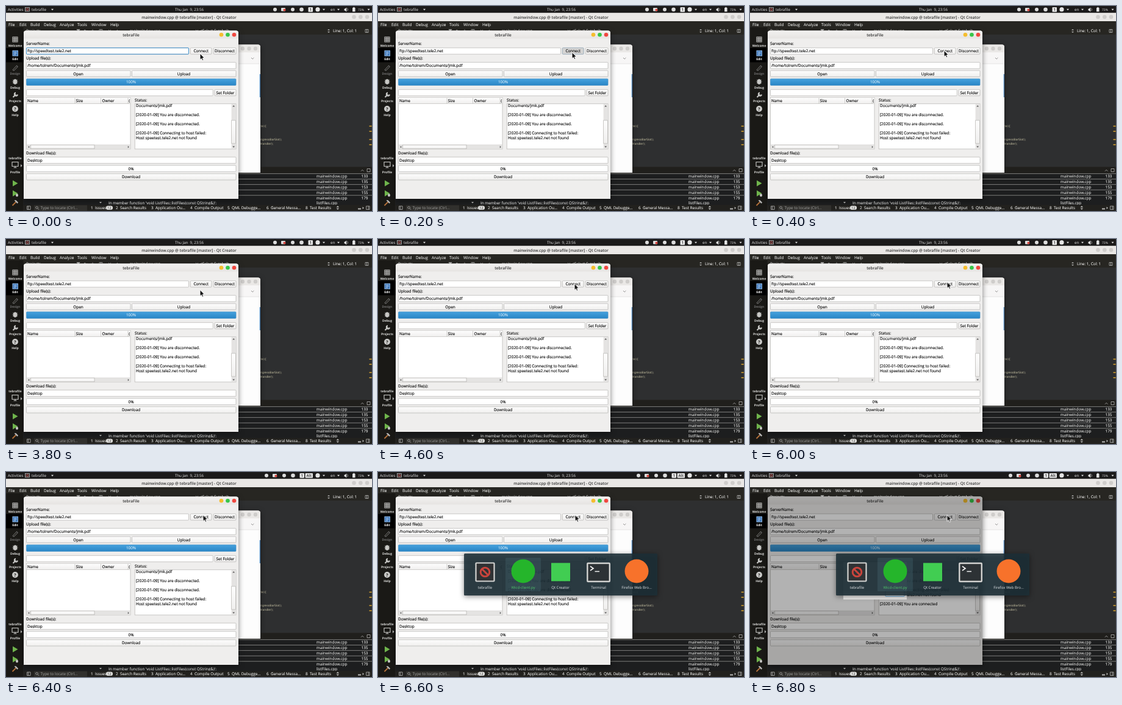
Write an HTML page that moves like this. It is 600 by 337 pixels and loops after 8000 ms.

```html
<!DOCTYPE html>
<html lang="en">
<head>
<meta charset="utf-8">
<title>tebraFile</title>
<style>
html, body { margin: 0; width: 100%; height: 100%; overflow: hidden; background: #2e2f30; }
svg { display: block; width: 100vw; height: 100vh; font: 6.4px "Open Sans", "Noto Sans", sans-serif; text-rendering: geometricPrecision; }
text { white-space: pre; }
.mid { text-anchor: middle; }
.end { text-anchor: end; }
.bold { font-weight: 600; }
.ink { fill: #111; stroke: #111; stroke-width: .16; }
.light { fill: #e6e6e4; stroke: #e6e6e4; stroke-width: .1; }
.mode { font-size: 5px; font-weight: 700; text-anchor: middle; fill: #dededc; }
.icon { fill: none; stroke: #c8c8c6; stroke-width: 1.1; }
.field { fill: #fff; stroke: #b4b2b0; stroke-width: .7; }
.button { fill: url(#face); stroke: #b4b2b0; stroke-width: .7; }
.tool { fill: none; stroke: #b8b8b6; stroke-width: .8; }
.raised { filter: drop-shadow(0 2px 4px rgba(0, 0, 0, .5)); }

/* every change is a hard cut */
.focus, .pressed, .cursor, .tray, .alt, .switcher, .dim, .log, .thumb {
  animation: 8s step-end infinite;
}
.focus { animation-name: focus; }
.pressed { animation-name: press; }
.cursor { animation-name: point; }
.tray { animation-name: shift; }
.alt { animation-name: alt; }
.switcher { animation-name: switch; }
.dim { animation-name: dim; }
.log { animation-name: scroll; }
.thumb { animation-name: thumb; }
@keyframes focus { 0% { opacity: 1 } 2.5%, 100% { opacity: 0 } }
@keyframes press { 0% { opacity: 0 } 2.5% { opacity: 1 } 5%, 100% { opacity: 0 } }
@keyframes point {
  0% { transform: translate(318px, 78px) }
  2.5% { transform: translate(318px, 76px) }
  5% { transform: translate(318px, 73px) }
  47.5% { transform: translate(318px, 83.5px) }
  50% { transform: translate(317px, 88px) }
  52.5% { transform: translate(318px, 78px) }
  55% { transform: translate(322px, 75px) }
  57.5% { transform: translate(322px, 73.5px) }
  62.5% { transform: translate(322px, 72.5px) }
  65% { transform: translate(323px, 71.5px) }
  67.5%, 100% { transform: translate(323px, 70.5px) }
}
@keyframes shift { 0% { transform: none } 77.5%, 100% { transform: translateX(-14px) } }
@keyframes alt { 0% { opacity: 0 } 77.5%, 100% { opacity: 1 } }
@keyframes switch { 0% { opacity: 0 } 82.5%, 100% { opacity: 1 } }
@keyframes dim { 0% { opacity: 0 } 85%, 100% { opacity: 1 } }
@keyframes scroll { 0% { transform: none } 85%, 100% { transform: translateY(-15px) } }
@keyframes thumb { 0% { transform: none } 85%, 100% { transform: translateY(2px) } }
</style>
</head>
<body>
<svg viewBox="0 0 600 337" preserveAspectRatio="none">
<defs>
  <linearGradient id="face" x2="0" y2="1"><stop stop-color="#fdfdfd"/><stop offset="1" stop-color="#f0efee"/></linearGradient>
  <linearGradient id="full" x2="0" y2="1"><stop stop-color="#45a1dd"/><stop offset="1" stop-color="#2a86c6"/></linearGradient>
  <linearGradient id="bar" x2="0" y2="1"><stop stop-color="#f2f1f0"/><stop offset="1" stop-color="#e6e4e2"/></linearGradient>
  <clipPath id="logBox"><rect x="211.5" y="161" width="157" height="73.5"/></clipPath>
  <clipPath id="lastRow"><rect x="29" y="317" width="571" height="9.8"/></clipPath>
  <path id="down" d="M-2-1h4l-2 2.5z"/>
  <path id="window" d="M29 317V44.5a4 4 0 0 1 4-4h344a4 4 0 0 1 4 4V317z"/>
</defs>

<!-- IDE frame -->
<rect width="600" height="337" fill="#2e2f30"/>
<rect y="25" width="600" height="22" fill="#272622"/>
<rect y="11" width="600" height="14" fill="#eae8e6"/>
<text class="mid bold" x="300" y="20.5" font-size="6.5" fill="#333">mainwindow.cpp @ tebrafile [master] - Qt Creator</text>
<g fill="#cfcdcb"><circle cx="570.5" cy="18" r="3.3"/><circle cx="581.3" cy="18" r="3.3"/><circle cx="592" cy="18" r="3.3"/></g>
<g class="light" font-size="6.5">
  <text x="4" y="32.6">File</text><text x="22" y="32.6">Edit</text><text x="40" y="32.6">Build</text>
  <text x="62" y="32.6">Debug</text><text x="88" y="32.6">Analyze</text><text x="117" y="32.6">Tools</text>
  <text x="140" y="32.6">Window</text><text x="171" y="32.6">Help</text>
</g>
<g class="light">
  <text x="33" y="43">Projects</text><text x="203" y="43">mainwindow.cpp</text>
  <text x="318" y="43">&lt;Select Symbol&gt;</text><text x="536" y="43">Line: 1, Col: 1</text>
</g>
<g class="tool">
  <path d="M116 38.5h5l-2 2.5v3h-1v-3z" fill="#b8b8b6"/>
  <path d="M128 41h6M128 39.5h2.5M131.5 42.5h2.5M142 38.5v5M139.5 41h5M153 38.5h5v5h-5zM155.5 38.5v5M168 39l4 4M172 39l-4 4"/>
  <path d="M181 41h5M183 39l-2 2 2 2M311 39l4 4M315 39l-4 4"/>
  <path d="M589 38.5h5v5h-5zM591.5 38.5v5"/>
</g>
<path d="M527 40l2-2 2 2zM527 42l2 2 2-2z" fill="#b8b8b6"/>

<!-- mode sidebar -->
<rect y="35" width="28.5" height="302" fill="#1a1916"/>
<rect y="69" width="28.5" height="23.5"/>
<g class="icon">
  <path d="M11 51h8v8h-8zM11 53.7h8M11 56.3h8M13.7 51v8M16.3 51v8"/>
  <rect x="11" y="73.5" width="8.5" height="8.5" fill="#3a74b8" stroke="#8db4de"/>
  <path d="M13 76h4.5M13 78h4.5M13 80h3" stroke="#e4f1ff" stroke-width=".7"/>
  <path d="M11 105l6.5-7 1.8 1.8-6.5 6.5z" stroke="#686866"/>
  <ellipse cx="15" cy="124.5" rx="2.7" ry="3.7" fill="#c8c8c6"/>
  <path d="M11 121.5l8 5.5M11 127l8-5.5M10.5 124.3h9" stroke-width=".8"/>
  <path d="M11.5 150l4.8-4.8M16 142.5a2.6 2.6 0 1 0 3 3" stroke-width="2"/>
  <circle cx="15" cy="169" r="5" fill="#c8c8c6" stroke="none"/>
  <path d="M10 256.5h10v7h-10zM15 263.5v2M12.5 265.7h5"/>
</g>
<text class="mid" x="15" y="171.6" font-size="7" font-weight="700" fill="#1a1916">?</text>
<path d="M24 260l2.5 2.5-2.5 2.5z" fill="#c8c8c6"/>
<g class="mode">
  <text x="15" y="66.5">Welcome</text><text x="15" y="89.3" fill="#fff">Edit</text><text x="15" y="112.8" fill="#707070">Design</text>
  <text x="15" y="135.5">Debug</text><text x="15" y="158.3">Projects</text><text x="15" y="181.3">Help</text>
  <text x="15" y="251.5">tebrafile</text><text x="15" y="274.8">Profile</text>
</g>
<path d="M11 286.5l8.5 5-8.5 5zM11 303l8.5 5-8.5 5z" fill="#6fb44c"/>
<ellipse cx="18" cy="311" rx="2" ry="2.6" fill="#c8c8c6"/>
<path d="M10.5 328l6-6" stroke="#b5713a" stroke-width="1.8"/><path d="M13.5 319.5l5 5.2 1.6-1.6-4-4.2z" fill="#b9b9b9"/>

<!-- editor remains -->
<g font-size="4.6" font-family="DejaVu Sans, sans-serif" fill="#c9c4a4">
  <text x="417.5" y="198.8">te){</text><text x="417" y="220.8">ngressBarSlot);</text><text x="417" y="227.6">Handler);</text>
</g>
<path d="M595.5 197.5h4M595.5 206h4M595.5 219.5h4M595.5 228h4" stroke="#dba52c" stroke-width="1.6"/>

<!-- window behind -->
<g class="raised">
  <path d="M370 63.5h43a4 4 0 0 1 4 4V274h-47z" fill="#fdfdfd"/>
  <path d="M370 63.5h43a4 4 0 0 1 4 4V76.500h-47z" fill="#eae8e6"/>
</g>
<rect x="370" y="76.5" width="47" height="18.5" fill="#f7f6f6"/>
<path d="M380 95h37" stroke="#dcdcdc" stroke-width=".7"/>
<g fill="#cfcdcb"><circle cx="388" cy="70" r="3.2"/><circle cx="398.5" cy="70" r="3.2"/><circle cx="409" cy="70" r="3.2"/></g>
<path d="M402 85l2.2 2.2 2.2-2.2" fill="none" stroke="#777" stroke-width=".8"/>
<path d="M416.3 112v38" stroke="#4580b8" stroke-width="1.2"/>

<!-- issues pane -->
<rect x="28.500" y="274.500" width="571.500" height="52.500" fill="#1d1e1f"/>
<path d="M417.500 264.500H600v10.500H380v-1h37.500z" fill="#201f1c"/>
<path class="tool" d="M582 271.500l2.200-2.200 2.200 2.200M592 267.500h5v5h-5z"/>
<path d="M380 275.600h220M380 284.500h220M380 293.400h220M380 302.300h220M380 311.200h220" stroke="#a6a6a4" stroke-width=".7"/>
<g class="light">
  <text x="509" y="282">mainwindow.cpp</text><text class="end" x="593.500" y="282">133</text>
  <text x="509" y="290.900">mainwindow.cpp</text><text class="end" x="593.500" y="290.900">135</text>
  <text x="509" y="299.800">mainwindow.cpp</text><text class="end" x="593.500" y="299.800">153</text>
  <text x="509" y="308.700">mainwindow.cpp</text><text class="end" x="593.500" y="308.700">155</text>
  <text x="509" y="317.600">mainwindow.cpp</text><text class="end" x="593.500" y="317.600">179</text>
  <g clip-path="url(#lastRow)">
    <text x="168" y="325.500">In member function 'void ListFiles::listFiles(const QString&amp;)':</text><text x="509" y="325.800">listFiles.cpp</text>
  </g>
</g>
<path d="M153 322h4l-2 2.500z" fill="#b8b8b6"/>

<!-- status bar -->
<rect x="28.500" y="326.800" width="571.500" height="10.200" fill="#22211e"/>
<path class="tool" d="M34.500 329h5.500v5.500h-5.500zM36.500 329v5.500M590.500 329h5.500v5.500h-5.500zM594 329v5.500"/>
<path d="M577 332.500h5v2h-5zM584.500 330l2.500 2-2.500 2z" fill="#b8b8b6"/>
<rect x="46" y="327.500" width="87" height="9" fill="#31302d"/>
<path class="tool" d="M52 332.800l2 2M50.500 329.500a1.800 1.800 0 1 0 .1 0"/>
<text x="56.500" y="334.300" fill="#a5a5a3">Type to locate (Ctrl...</text>
<g class="light">
  <text x="139" y="334.300">1  Issues</text><text x="180" y="334.300">2  Search Results</text>
  <text x="238" y="334.300">3  Application Ou...</text><text x="302" y="334.300">4  Compile Output</text>
  <text x="363" y="334.300">5  QML Debugge...</text><text x="427" y="334.300">6  General Messa...</text>
  <text x="491" y="334.300">8  Test Results</text>
</g>
<rect x="164" y="328.500" width="11" height="6.500" rx="3" fill="#e0e0de"/>
<text class="mid" x="169.500" y="333.800" font-size="5.500" fill="#222">12</text>
<path d="M541.500 331l2.300-2.500 2.300 2.500zM541.500 332.500l2.300 2.500 2.300-2.500z" fill="#b8b8b6"/>

<!-- top panel -->
<rect width="600" height="11.200" fill="#1b1a1a"/>
<g fill="#e4e4e4" font-size="6.200">
  <text x="3" y="7.900">Activities</text><text x="42" y="7.900">tebrafile</text>
  <text class="mid" x="300.500" y="7.900">Thu Jan  9, 23:56</text>
  <text x="532" y="7.900">en</text><text x="577" y="7.600" font-size="5">73%</text>
  <use href="#down" x="76" y="5.700"/><use href="#down" x="521" y="5.700"/><use href="#down" x="545" y="5.700"/><use href="#down" x="594.500" y="5.700"/>
  <circle cx="511" cy="5.700" r="3.600"/>
  <path d="M554.500 4.500h1.500l2.200-2v7l-2.200-2h-1.500z"/><rect x="568" y="2.800" width="4.500" height="6.500" rx=".6"/><rect x="569.300" y="1.800" width="2" height="1"/>
</g>
<path d="M559.500 3.500q2 2.300 0 4.600" class="tool"/>
<rect x="31.500" y="2.500" width="7" height="6.200" fill="#333" stroke="#ccc" stroke-width=".7"/><circle cx="35" cy="5.600" r="1.800" fill="none" stroke="#c44" stroke-width=".8"/>
<g class="tray">
  <g fill="#dcdcdc"><circle cx="441" cy="5.700" r="3"/><rect x="451" y="3" width="7" height="5.500" rx="1"/><circle cx="470" cy="5.700" r="3"/><circle cx="484.500" cy="5.700" r="3.300"/></g>
  <circle cx="456.500" cy="6.500" r="2" fill="#d8433c"/>
  <rect x="495.500" y="2" width="7.500" height="7.800" rx="1" fill="#e6e6e6"/>
  <text class="mid bold" x="499.200" y="8.200" font-size="6.200" fill="#222">1</text>
</g>
<g class="alt"><rect x="490.500" y="2" width="12.500" height="7.800" rx="1" fill="#e6e6e6"/><text class="mid bold" x="496.700" y="8.200" font-size="6.200" fill="#222">Alt</text></g>

<!-- transfer window -->
<use class="raised" href="#window" fill="#efeeed"/>
<path d="M29 53.500V44.500a4 4 0 0 1 4-4h344a4 4 0 0 1 4 4v9z" fill="url(#bar)"/>
<text class="mid bold" x="205" y="49.600" font-size="6.500" fill="#333">tebraFile</text>
<circle cx="353" cy="47.300" r="3.300" fill="#f5bd2e"/><circle cx="363.500" cy="47.300" r="3.300" fill="#37c648"/><circle cx="374" cy="47.300" r="3.300" fill="#f0473f"/>
<g class="ink">
  <text x="33" y="64.300">ServerName:</text><text x="33" y="88.400">Upload file(s):</text>
  <text x="211" y="156.800">Status:</text><text x="33" y="244">Download file(s):</text>
</g>
<rect class="field" x="33.500" y="68.800" width="266" height="10.400" rx="1"/>
<rect class="focus" x="33.500" y="68.800" width="266" height="10.400" rx="1" fill="none" stroke="#3d8fca"/>
<rect class="button" x="302.300" y="68.800" width="34.700" height="10.400" rx="1"/>
<rect class="pressed" x="302.300" y="68.800" width="34.700" height="10.400" rx="1" fill="#d5d4d3" stroke="#8fa9bd" stroke-width=".7"/>
<rect class="button" x="340.300" y="68.800" width="36.700" height="10.400" rx="1"/>
<rect class="field" x="33.500" y="92.600" width="343.500" height="10.400" rx="1"/>
<rect class="button" x="33.500" y="106.200" width="170.500" height="10.200" rx="1"/>
<rect class="button" x="206.500" y="106.200" width="170.500" height="10.200" rx="1"/>
<rect x="33.500" y="119.800" width="343.500" height="10.600" rx="1" fill="url(#full)" stroke="#3a8cc4" stroke-width=".7"/>
<rect class="field" x="33.500" y="137.300" width="305.800" height="10.400" rx="1"/>
<rect class="button" x="342.200" y="137.300" width="34.800" height="10.400" rx="1"/>
<rect class="field" x="33.500" y="150.500" width="170.500" height="84.500"/>
<path d="M33.800 150.800h170v9.700h-170z" fill="url(#face)"/>
<path d="M33.800 160.500h170M113 151v9.500M155.500 151v9.500M200 151v9.500M33.800 228.300h170" stroke="#bfbdbb" stroke-width=".7"/>
<rect x="33.800" y="228.600" width="170" height="6.200" fill="#e4e3e2"/>
<rect class="button" x="40.500" y="228.600" width="104.500" height="6.100"/>
<path d="M38.200 230l-2 1.700 2 1.700zM199.800 230l2 1.700-2 1.700z" fill="#555"/>
<rect class="field" x="211.200" y="160.800" width="165.800" height="74.200"/>
<rect x="369.600" y="161.100" width="7.100" height="73.600" fill="#e4e3e2"/>
<rect class="button thumb" x="369.700" y="188" width="6.900" height="38"/>
<path d="M371.300 165.500l1.900-2.200 1.900 2.200zM371.300 230.500l1.900 2.200 1.900-2.200z" fill="#555"/>
<rect class="field" x="33.500" y="248.300" width="343.500" height="10.400" rx="1"/>
<rect class="field" x="33.500" y="262" width="343.500" height="10.400" rx="1"/>
<rect class="button" x="33.500" y="275.800" width="343.500" height="10.200" rx="1"/>
<g class="ink">
  <text x="35" y="76.300">ftp://speedtest.tele2.net</text><text x="35" y="100.100">/home/tolrem/Documents/jmk.pdf</text><text x="35" y="255.800">Desktop</text>
  <text x="35" y="157.900">Name</text><text x="114.500" y="157.900">Size</text><text x="157.500" y="157.900">Owner</text><text x="201.300" y="157.900">(</text>
  <g class="mid">
    <text x="319.700" y="76.300">Connect</text><text x="358.600" y="76.300">Disconnect</text>
    <text x="118.500" y="113.600">Open</text><text x="291.500" y="113.600">Upload</text>
    <text x="205" y="127.400" fill="#fff" stroke="none">100%</text><text x="359.500" y="144.800">Set Folder</text>
    <text x="205" y="269.500">0%</text><text x="205" y="283.200">Download</text>
  </g>
  <g clip-path="url(#logBox)"><g class="log">
    <text x="213" y="166.300">Documents/jmk.pdf</text>
    <text x="213" y="181.200">[2020-01-09] You are disconnected.</text>
    <text x="213" y="196.200">[2020-01-09] You are disconnected.</text>
    <text x="213" y="211.200">[2020-01-09] Connecting to host failed:</text>
    <text x="213" y="218.700">Host speetest.tele2.net not found</text>
    <text class="dim" x="213" y="233.700">[2020-01-09] You are connected</text>
  </g></g>
</g>

<!-- modal dialog shading the window -->
<g class="dim">
  <use href="#window" opacity=".3"/>
  <rect x="153" y="148" width="104" height="61.500" fill="#f0efee"/>
  <rect x="222" y="195" width="31" height="9.500" rx="1" fill="#fafafa" stroke="#3d8fca" stroke-width=".8"/>
</g>

<!-- task switcher -->
<g class="switcher">
  <rect class="raised" x="141" y="134" width="317" height="69" rx="1.500" fill="#1d2f37" fill-opacity=".88"/>
  <rect x="209" y="141" width="58" height="55" rx="1.500" fill="#54808a" fill-opacity=".22"/>
  <rect x="160.500" y="149.500" width="30" height="30" rx="1" fill="#303234" stroke="#d2d2d0" stroke-width="2.200"/>
  <circle cx="175.500" cy="164.500" r="7.300" fill="none" stroke="#c9443c" stroke-width="3"/><path d="M170.500 159.500l10 10" stroke="#c9443c" stroke-width="3"/>
  <circle cx="238" cy="163" r="19.500" fill="#25b52b"/>
  <rect x="284" y="149.500" width="31" height="30" fill="#41cd52"/>
  <rect x="343.300" y="150" width="36.500" height="30" rx="1" fill="#2d3235" stroke="#d2d2d0" stroke-width="2.400"/>
  <path d="M348 155l5 3.500-5 3.500M355.500 163.500h7.500" fill="none" stroke="#f2f2f2" stroke-width="1.700"/>
  <circle cx="424" cy="163" r="19.500" fill="#f7722b"/>
  <g class="mid" font-size="6.050" fill="#e2e6e8">
    <text x="175.500" y="192">tebrafile</text><text x="238" y="192" fill="#4fc66a">Wicd-client.py</text>
    <text x="299" y="192">Qt Creator</text><text x="361.500" y="192">Terminal</text><text x="424" y="192">Firefox Web Bro...</text>
  </g>
</g>

<path class="cursor" d="M0 0V10.500L2.400 8.400L4 11.800L5.800 11L4.300 7.700H7.500Z" fill="#111" stroke="#fff"/>
</svg>
</body>
</html>
```
